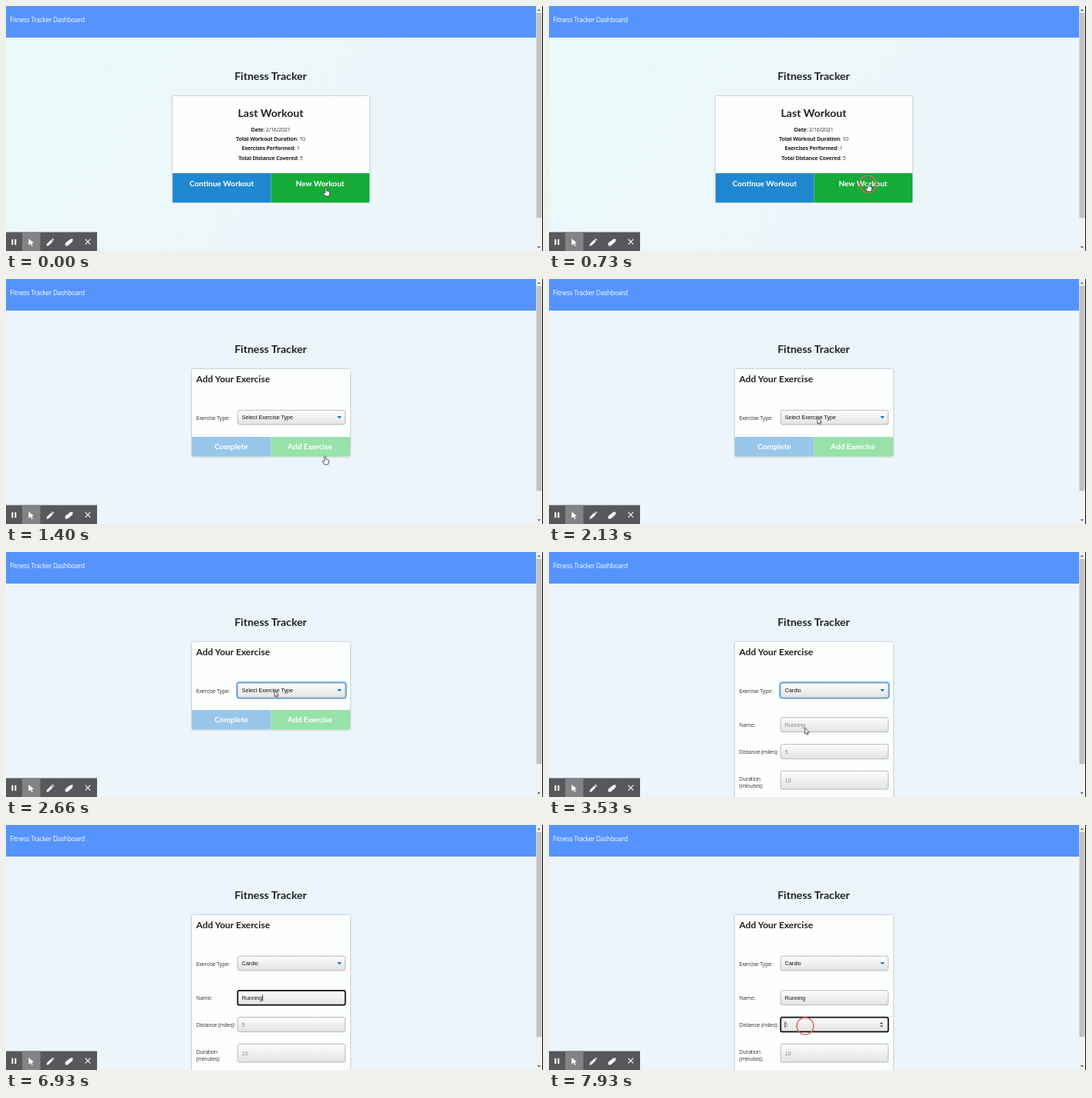
Animation of 696x318 px, one loop 8000 ms. Source, as an HTML page:

```html
<!DOCTYPE html>
<html lang="en">
<head>
<meta charset="utf-8">
<title>Fitness Tracker</title>
<style>
  html, body { margin: 0; width: 100%; height: 100%; overflow: hidden; }
  svg { display: block; width: 696px; height: 318px; }
  .ui { font: 7.1px "Open Sans", "Noto Sans", sans-serif; letter-spacing: -.03em; fill: #333; }
  .ui b, .strong { font-weight: 700; fill: #222; }
  .brand { font-size: 8.4px; fill: #fff; }
  .head { font: 700 14.1px Lato, sans-serif; fill: #212121; }
  .sub { font-size: 12px; }
  .btn { font: 700 10.1px Lato, sans-serif; fill: #fff; }
  .field { font: 7.1px "Liberation Sans", Arial, sans-serif; fill: #111; }
  .hint { fill: #858585; }
  .mid { text-anchor: middle; }
  .box { fill: url(#shade); stroke: #aaa; stroke-width: .8; }
  .focus { fill: none; stroke: #101010; stroke-width: 1.7; }
  .card { fill: #fdfefe; }
  .shadow { filter: drop-shadow(0 .5px 1.3px rgba(0, 0, 0, .38)); }
  .cursor { fill: #fff; stroke: #333; stroke-width: .8; stroke-linejoin: round; }
</style>
</head>
<body>
<svg viewBox="0 0 696 318">
  <defs>
    <linearGradient id="shade" x2="0" y2="1">
      <stop stop-color="#fdfdfd"/><stop offset="1" stop-color="#e3e3e3"/>
    </linearGradient>
    <linearGradient id="mint" x2="1" y2=".35">
      <stop stop-color="#ebf9f8"/><stop offset="1" stop-color="#ecf6fc"/>
    </linearGradient>
  </defs>

  <rect width="696" height="318" fill="#ebf5fb"/>
  <rect id="tint" width="696" height="318" fill="url(#mint)"/>
  <rect width="687" height="41" fill="#5593ff"/>
  <text class="ui brand" x="5" y="21.2">Fitness Tracker Dashboard</text>
  <text class="head mid" x="343" y="96">Fitness Tracker</text>

  <g id="summary">
    <rect class="card shadow" x="216" y="117" width="255" height="138" rx="1.5"/>
    <text class="head mid" x="343" y="144.3">Last Workout</text>
    <g id="stats"></g>
    <path d="M216 217H343.5V255H217.5Q216 255 216 253.5Z" fill="#1f88d1"/>
    <path d="M343.5 217H471V253.5Q471 255 469.5 255H343.5Z" fill="#16ab39"/>
    <text class="btn mid" x="279.5" y="233.8">Continue Workout</text>
    <text class="btn mid" x="407" y="233.8">New Workout</text>
  </g>

  <g id="editor">
    <rect id="panelShadow" class="card shadow" x="241" y="117" width="205" rx="1.5"/>
    <rect id="panel" class="card" x="241" y="117" width="205" rx="1.5"/>
    <text class="head sub" x="246.5" y="134.2">Add Your Exercise</text>
    <text class="ui" x="246.5" y="183">Exercise Type:</text>
    <rect id="glow" x="299.3" y="169.3" width="141.4" height="20.4" rx="3.4" fill="none" stroke="#62a9ea" stroke-width="2.2"/>
    <rect class="box" x="300.3" y="170.3" width="139.4" height="18.6" rx="2.6"/>
    <path d="M429.2 178H435L432.1 181.3Z" fill="#0b78c4"/>
    <text id="type" class="field" x="305.8" y="182.2"></text>

    <g id="actions">
      <g id="fills">
        <path d="M241 205H343.5V230.5H242.5Q241 230.5 241 229Z" fill="#98c7e9"/>
        <path d="M343.5 205H446V229Q446 230.5 444.5 230.5H343.5Z" fill="#98e2a9"/>
      </g>
      <text class="btn mid" x="292" y="221.3">Complete</text>
      <text class="btn mid" x="394" y="221.3">Add Exercise</text>
    </g>

    <g id="cardio">
      <text class="ui" x="246.5" y="227.4">Name:</text>
      <text class="ui" x="246.5" y="262">Distance (miles):</text>
      <text class="ui" x="246.5" y="296.6">Duration</text>
      <text class="ui" x="246.5" y="306">(minutes):</text>
      <rect class="box" x="300.3" y="214.8" width="139.4" height="18.8" rx="2.6"/>
      <rect class="box" x="300.3" y="249.5" width="139.4" height="19" rx="2.6"/>
      <rect class="box" x="300.3" y="284.2" width="139.4" height="23.8" rx="2.6"/>
      <text id="name" class="field" x="305.8" y="227"></text>
      <text class="field hint" x="305.8" y="261.6">5</text>
      <text class="field hint" x="305.8" y="298.8">10</text>
      <rect id="focus" class="focus" x="300.3" width="139.4" height="18.8" rx="2"/>
      <path id="spinner" d="M428.8 258.2H433L430.9 255.8ZM428.8 260.2H433L430.9 262.6Z" fill="#444"/>
      <path id="caret" d="M0 0V8" stroke="#111" stroke-width=".8"/>
    </g>
  </g>

  <g id="scrollbar">
    <rect x="687" width="9" height="318" fill="#f1f1f1"/>
    <rect x="687.5" y="9" width="7" height="266" fill="#c1c1c1"/>
    <path d="M688.6 6.3H692.8L690.7 4ZM688.6 312H692.8L690.7 314.3Z" fill="#555"/>
    <rect x="695" width="1" height="318" fill="#111"/>
  </g>

  <g id="toolbar" fill="#fff">
    <rect y="293.5" width="118" height="24.5" fill="#56585b"/>
    <rect x="21" y="293.5" width="23.5" height="24.5" fill="#828384"/>
    <path d="M7.3 302.8H9.3V310H7.3ZM11.3 302.8H13.3V310H11.3Z"/>
    <path d="M29.3 302L36 307.6L33.1 307.9L34.8 311L33.4 311.7L31.8 308.5L29.3 310.6Z"/>
    <path d="M52.5 311.5L53 308.8L58.6 303.2L60.8 305.4L55.2 311ZM59.3 302.5L60.3 301.6L62.4 303.7L61.5 304.7Z"/>
    <path d="M76.7 307.7L83.5 302.6L86.6 302.3L86.2 305.8L80 311.2L76.9 311.3Z"/>
    <path d="M102.7 302.7L109.3 309.3M109.3 302.7L102.7 309.3" fill="none" stroke="#fff" stroke-width="1.2"/>
  </g>

  <circle id="ring" r="11" fill="none" stroke="#df6363" stroke-width="1.4"/>
  <path id="hand" class="cursor" d="M-.9 .5Q0-.6 .9 .5V4L3.2 4.4L5 5.3V8L4 10.8H-.6L-3.4 7.2Q-3.5 6-2.3 6.2L-.9 7.2Z"/>
  <path id="arrow" class="cursor" d="M0 0V8L1.8 6.5L3.1 9.2L4.4 8.6L3.2 6H5.6Z"/>
</svg>

<script>
const LOOP = 8000;
const el = id => document.getElementById(id);
const show = (id, on) => el(id).style.display = on ? "" : "none";

// Value of the last step that has started by time t
const step = (track, t) => track.reduce((now, [at, ...value]) => at <= t ? value : now, []);

// time, cursor shape, tip x, tip y
const cursorTrack = [
  [0, "hand", 414.5, 236], [60, "hand", 414.4, 235], [130, "hand", 414.2, 233.4],
  [200, "hand", 414, 232], [260, "hand", 413.7, 230.8], [330, "hand", 413.5, 230],
  [1730, "hand", 407, 222], [1800, "hand", 392, 208], [1860, "arrow", 374, 196],
  [1930, "arrow", 360, 187], [2000, "arrow", 351, 181.5], [2130, "arrow", 348, 179.8],
  [3460, "arrow", 336, 222], [3530, "arrow", 331.7, 228], [3600, "none", 0, 0]
];

// time, x, y, time the fade begins, end
const clicks = [
  [660, 413.5, 231, 800, 860],
  [2400, 348, 181, 2600, 2660],
  [4260, 332, 231, 4400, 4460],
  [7860, 332, 261, 8000, 8060]
];

const keyTimes = [6130, 6200, 6330, 6530, 6800, 6860, 6930];
const caretTrack = [
  [0, false], [4260, true], [4800, false], [5330, true], [5930, false],
  [6130, true], [7600, false], [7860, true]
];
const fadeTrack = [[0, 0], [1330, .5], [1400, 1]];

const stats = [
  ["Date", "2/16/2021"], ["Total Workout Duration", 10],
  ["Exercises Performed", 1], ["Total Distance Covered", 5]
];
el("stats").innerHTML = stats.map(([label, value], i) =>
  `<text class="ui mid" x="343" y="${162.8 + i * 12.25}"><tspan class="strong">${label}</tspan>: ${value}</text>`
).join("");

function drawPointer(t) {
  const [shape, x, y] = step(cursorTrack, t);
  for (const id of ["hand", "arrow"]) {
    show(id, id === shape);
    el(id).setAttribute("transform", `translate(${x} ${y})`);
  }
  const click = clicks.find(c => t >= c[0] && t < c[4]);
  show("ring", click);
  if (click) {
    el("ring").setAttribute("cx", click[1]);
    el("ring").setAttribute("cy", click[2]);
    el("ring").style.opacity = t < click[3] ? 1 : .5;
  }
}

function drawPanel(t) {
  const cardio = t >= 3460;
  const [fade] = step(fadeTrack, t);
  const height = cardio ? 230 : 113.5;
  el("panel").setAttribute("height", height);
  el("panelShadow").setAttribute("height", height);
  el("panelShadow").style.opacity = fade;
  el("fills").style.opacity = fade;
  const grey = 188 + 67 * fade;
  for (const label of el("actions").querySelectorAll("text"))
    label.style.fill = `rgb(${grey},${grey},${grey})`;
  show("actions", !cardio);
  show("cardio", cardio);
  show("glow", t >= 2400 && t < 4260);
  el("type").textContent = cardio ? "Cardio" : "Select Exercise Type";
}

function drawFields(t) {
  const typed = "Running".slice(0, keyTimes.filter(k => k <= t).length);
  const name = el("name");
  name.textContent = typed || "Running";
  name.classList.toggle("hint", !typed);
  const onDistance = t >= 7860;
  show("focus", t >= 4260);
  show("spinner", onDistance);
  el("focus").setAttribute("y", onDistance ? 249.6 : 214.8);
  show("caret", step(caretTrack, t)[0]);
  const x = typed && !onDistance ? 306.2 + name.getComputedTextLength() : 306;
  el("caret").setAttribute("transform", `translate(${x} ${onDistance ? 255 : 220.3})`);
}

function draw(t) {
  show("tint", t < 860);
  show("summary", t < 1260);
  show("editor", t >= 1260);
  drawPanel(t);
  drawFields(t);
  drawPointer(t);
}

const start = performance.now();
function tick() {
  draw((performance.now() - start) % LOOP);
  requestAnimationFrame(tick);
}
tick();
</script>
</body>
</html>
```
